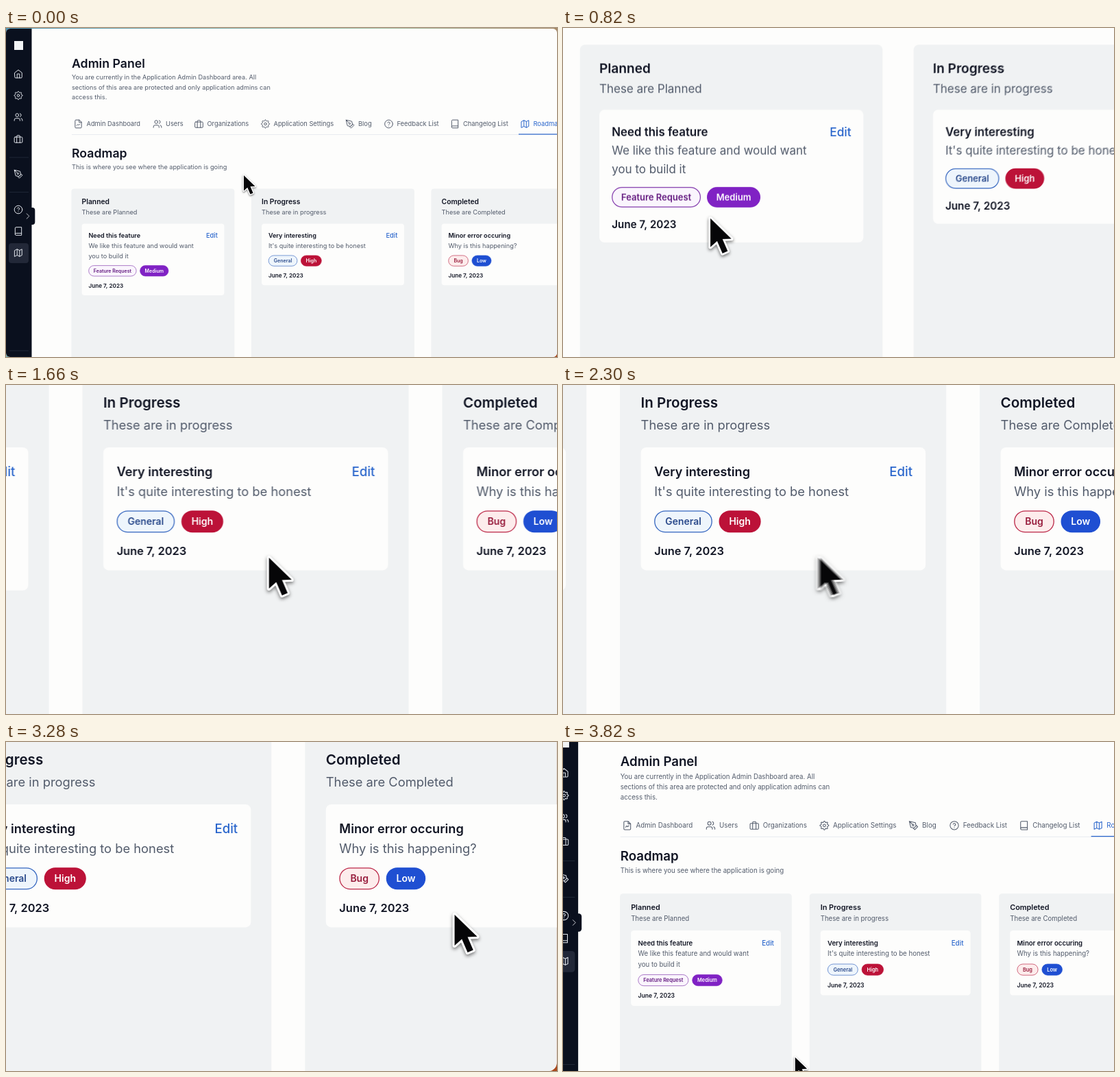
An HTML page with a canvas for the animation above (3840 ms loop, 804 by 480 pixels).

```html
<!DOCTYPE html>
<html lang="en">
<head>
<meta charset="utf-8">
<title>Roadmap walkthrough</title>
<style>
html, body { margin: 0; width: 100%; height: 100%; overflow: hidden; background: #fdfdfc; }
canvas { display: block; width: 804px; height: 480px; }
</style>
</head>
<body>
<canvas id="stage" width="804" height="480"></canvas>
<script>
const W = 804, H = 480, LOOP = 3840, SHUTTER = 6;
const ctx = document.getElementById('stage').getContext('2d', { alpha: false });
const INK = '#111524', SOFT = '#525b6b', BLUE = '#2a66cc', PAGE = '#fdfdfc', PANEL = '#f0f2f3', DARK = '#0a101e';

// Icons are drawn on a 24 x 24 grid
function gear() {
  let d = 'M';
  for (let i = 0; i < 64; i++) {
    const a = i / 64 * Math.PI * 2, r = 9 + 1.5 * Math.cos(8 * a);
    d += `${12 + r * Math.cos(a)} ${12 + r * Math.sin(a)}L`;
  }
  return d.slice(0, -1) + 'zM15 12a3 3 0 1 1-6 0 3 3 0 1 1 6 0';
}
const icons = {
  home: 'M3 9l9-7 9 7v11a2 2 0 0 1-2 2H5a2 2 0 0 1-2-2zM9 22V12h6v10',
  file: 'M14 2H6a2 2 0 0 0-2 2v16a2 2 0 0 0 2 2h12a2 2 0 0 0 2-2V8zM14 2v6h6M8 16l3-3 2 2 3-3',
  users: 'M16 21v-2a4 4 0 0 0-4-4H6a4 4 0 0 0-4 4v2M13 7a4 4 0 1 1-8 0 4 4 0 1 1 8 0M22 21v-2a4 4 0 0 0-3-3.9M16 3.1a4 4 0 0 1 0 7.8',
  bag: 'M4 7h16a2 2 0 0 1 2 2v10a2 2 0 0 1-2 2H4a2 2 0 0 1-2-2V9a2 2 0 0 1 2-2zM8 21V5a2 2 0 0 1 2-2h4a2 2 0 0 1 2 2v16',
  gear: gear(),
  pen: 'M12 19l7-7 3 3-7 7zM18 13l-1.5-7.5L2 2l3.5 14.5L13 18zM2 2l7.6 7.6M13 11a2 2 0 1 1-4 0 2 2 0 1 1 4 0',
  help: 'M22 12a10 10 0 1 1-20 0 10 10 0 1 1 20 0M9.1 9a3 3 0 0 1 5.8 1c0 2-3 3-3 3M12 17v.1',
  book: 'M4 19.5v-15A2.5 2.5 0 0 1 6.5 2H20v20H6.5a2.5 2.5 0 0 1 0-5H20',
  map: 'M3 6l6-3 6 3 6-3v15l-6 3-6-3-6 3zM9 3v15M15 6v15',
  chevron: 'M8 4l8 8-8 8'
};
for (const k in icons) icons[k] = new Path2D(icons[k]);
const arrow = new Path2D('M0 0V22.5L5.3 17.8 9.5 27.5 13.6 25.7 9.5 16.3 16.5 16z');

const tabs = [
  ['file', 105.5, 'Admin Dashboard'], ['users', 221, 'Users'], ['bag', 281.5, 'Organizations'],
  ['gear', 378.5, 'Application Settings'], ['pen', 502, 'Blog'], ['help', 558.5, 'Feedback List'],
  ['book', 655, 'Changelog List'], ['map', 757.5, 'Roadmap']
];
const sideIcons = [
  ['home', 67], ['gear', 98.5], ['users', 130], ['bag', 162], ['pen', 213],
  ['help', 265], ['book', 296.5], ['map', 328]
];
// Pill: label, width, fill, border, text colour
const columns = [
  { name: 'Planned', note: 'These are Planned', title: 'Need this feature',
    lines: ['We like this feature and would want', 'you to build it'],
    pills: [['Feature Request', 70, '#faf5fd', '#843cae', '#641a80'], ['Medium', 42, '#8022c4', '#8022c4', '#fff']] },
  { name: 'In Progress', note: 'These are in progress', title: 'Very interesting',
    lines: ["It's quite interesting to be honest"],
    pills: [['General', 42.3, '#eef5fc', '#3566c0', '#2a4a8c'], ['High', 30.5, '#bc1238', '#bc1238', '#fff']] },
  { name: 'Completed', note: 'These are Completed', title: 'Minor error occuring',
    lines: ['Why is this happening?'],
    pills: [['Bug', 29.3, '#fdecec', '#bc2848', '#981c3c'], ['Low', 28.7, '#1f4fd2', '#1f4fd2', '#fff']] }
];

// y is the middle of the capitals
function text(str, x, y, size = 9.17, color = SOFT, weight = 400, align = 'left') {
  ctx.font = `${weight} ${size}px Inter, sans-serif`;
  ctx.fillStyle = color;
  ctx.textAlign = align;
  ctx.fillText(str, x, y + size * .36);
}
function box(x, y, w, h, r, fill, border) {
  ctx.beginPath();
  ctx.roundRect(x, y, w, h, r);
  ctx.fillStyle = fill;
  ctx.fill();
  if (border) {
    ctx.strokeStyle = border;
    ctx.lineWidth = .65;
    ctx.stroke();
  }
}
function icon(name, x, y, color, size = 14) {
  ctx.save();
  ctx.translate(x - size / 2, y - size / 2);
  ctx.scale(size / 24, size / 24);
  ctx.strokeStyle = color;
  ctx.lineWidth = 1.7;
  ctx.lineCap = ctx.lineJoin = 'round';
  ctx.stroke(icons[name]);
  ctx.restore();
}

function drawColumn(col, i) {
  const x = 95.4 + 262.5 * i, cx = x + 15.2, tx = cx + 9.8;
  const drop = (col.lines.length - 1) * 14.7;
  box(x, 234.4, 238, 300, 4, PANEL);
  text(col.name, cx, 253, 10.3, INK, 600);
  text(col.note, cx, 269);
  box(cx, 285.5, 207.8, 89.7 + drop, 4, PAGE);
  text(col.title, tx, 303, 9.1, INK, 600);
  text('Edit', cx + 198.2, 303, 9.3, BLUE, 500, 'right');
  col.lines.forEach((line, n) => text(line, tx, 317.5 + n * 14.7));
  let px = tx;
  for (const [label, w, fill, border, color] of col.pills) {
    box(px + .3, 331.9 + drop, w - .6, 15.4, 7.7, fill, border);
    text(label, px + w / 2, 339.6 + drop, 7, color, 600, 'center');
    px += w + 4.9;
  }
  text('June 7, 2023', tx, 361 + drop, 8.2, INK, 600);
}

function drawSidebar() {
  ctx.fillStyle = DARK;
  ctx.fillRect(0, 1, 37.5, H);
  box(30, 262, 12.3, 25, 4, DARK);
  box(12, 19, 13, 13, 0, '#f3f5f6');
  box(4, 314, 29, 29, 4, '#222838');
  ctx.fillStyle = '#242c3c';
  for (const y of [188.5, 239, 470.5]) ctx.fillRect(5, y, 28, .8);
  for (const [name, y] of sideIcons) icon(name, 18, y, '#e2e6ec');
  icon('chevron', 32, 274.5, '#f4f5f8', 11);
}

function drawPage() {
  const back = ctx.createLinearGradient(0, 0, W, H);
  back.addColorStop(0, '#4f96b4');
  back.addColorStop(.5, '#a5c4a8');
  back.addColorStop(1, '#a8481c');
  ctx.fillStyle = back;
  ctx.fillRect(0, 0, W, H);
  ctx.save();
  ctx.beginPath();
  ctx.roundRect(0, 1, W, H - 1, 6);
  ctx.clip();
  ctx.fillStyle = PAGE;
  ctx.fillRect(0, 0, W, H);

  text('Admin Panel', 96, 51.5, 17.7, INK, 600);
  text('You are currently in the Application Admin Dashboard area. All', 96, 72);
  text('sections of this area are protected and only application admins can', 96, 86.5);
  text('access this.', 96, 101);
  ctx.fillStyle = '#e4e8ee';
  ctx.fillRect(96, 155.2, W, .8);
  for (const [name, x, label] of tabs) {
    const color = name === 'map' ? BLUE : SOFT;
    icon(name, x, 140, color);
    text(label, x + 12, 140, 9.3, color);
  }
  ctx.fillStyle = BLUE;
  ctx.fillRect(748, 154.4, 80, 1.2);
  text('Roadmap', 96, 182.5, 17.7, INK, 600);
  text('This is where you see where the application is going', 96, 202.5);
  columns.forEach(drawColumn);
  drawSidebar();
  ctx.restore();
}

// Critically damped spring from 0 to 1; t and start in ms
function spring(t, start, rate) {
  const k = Math.max(0, t - start) / 1000 * rate;
  return 1 - (1 + k) * Math.exp(-k);
}
// Each pan of the camera sets off just after the pointer does
function camera(t) {
  const zoom = spring(t, 496, 10.5) - spring(t, 3377, 10.5);
  const focus = 178 + 454.6 * spring(t, 1303, 12.5)
    + 171.9 * spring(t, 2300, 10.5) - 530.5 * spring(t, 3446, 10.5);
  return { s: 1 + zoom, x: -zoom * focus, y: -zoom * H };
}

// Pointer moves: start, end, then the place reached
const moves = [
  [400, 680, 198, 371], [1278, 1458, 494, 366], [2270, 2530, 729.5, 366], [3420, 3690, 338, 461]
];
function pointer(t) {
  let x = 347, y = 215;
  for (const [from, to, nx, ny] of moves) {
    const u = Math.min(1, Math.max(0, (t - from) / (to - from)));
    const e = u * u * (3 - 2 * u);
    x += (nx - x) * e;
    y += (ny - y) * e;
  }
  return { x, y };
}

function drawScene(t) {
  const c = camera(t), p = pointer(t);
  ctx.setTransform(c.s, 0, 0, c.s, c.x, c.y);
  drawPage();
  ctx.save();
  ctx.translate(p.x, p.y);
  ctx.lineJoin = 'round';
  ctx.lineWidth = 3;
  ctx.strokeStyle = '#fff';
  ctx.shadowColor = 'rgba(0,0,0,.5)';
  ctx.shadowBlur = 2.5 * c.s;
  ctx.shadowOffsetY = 1.2 * c.s;
  ctx.stroke(arrow);
  ctx.shadowColor = 'transparent';
  ctx.fillStyle = '#060608';
  ctx.fill(arrow);
  ctx.restore();
}

// Longest on-screen travel within the shutter time
function travel(a, b) {
  const c = camera(a), d = camera(b), p = pointer(a), q = pointer(b);
  const dist = (m, n) => Math.hypot(
    m.x * c.s + c.x - n.x * d.s - d.x, m.y * c.s + c.y - n.y * d.s - d.y);
  const left = { x: 100, y: 250 }, right = { x: 700, y: 250 };
  return Math.max(dist(p, q), dist(left, left), dist(right, right));
}

// Motion blur: average several moments inside the shutter time
const buffer = document.createElement('canvas');
buffer.width = W;
buffer.height = H;
const sum = buffer.getContext('2d');
function render(t) {
  const a = Math.max(0, t - SHUTTER / 2), b = Math.min(LOOP, t + SHUTTER / 2);
  const n = Math.min(12, Math.max(1, Math.ceil(travel(a, b) / 1.5)));
  if (n === 1) return drawScene(t);
  for (let i = 0; i < n; i++) {
    drawScene(a + (b - a) * (i + .5) / n);
    sum.globalAlpha = 1 / (i + 1);
    sum.drawImage(ctx.canvas, 0, 0);
  }
  ctx.setTransform(1, 0, 0, 1, 0, 0);
  ctx.drawImage(buffer, 0, 0);
}

const start = performance.now();
function tick() {
  render((performance.now() - start) % LOOP);
  requestAnimationFrame(tick);
}
tick();
</script>
</body>
</html>
```
